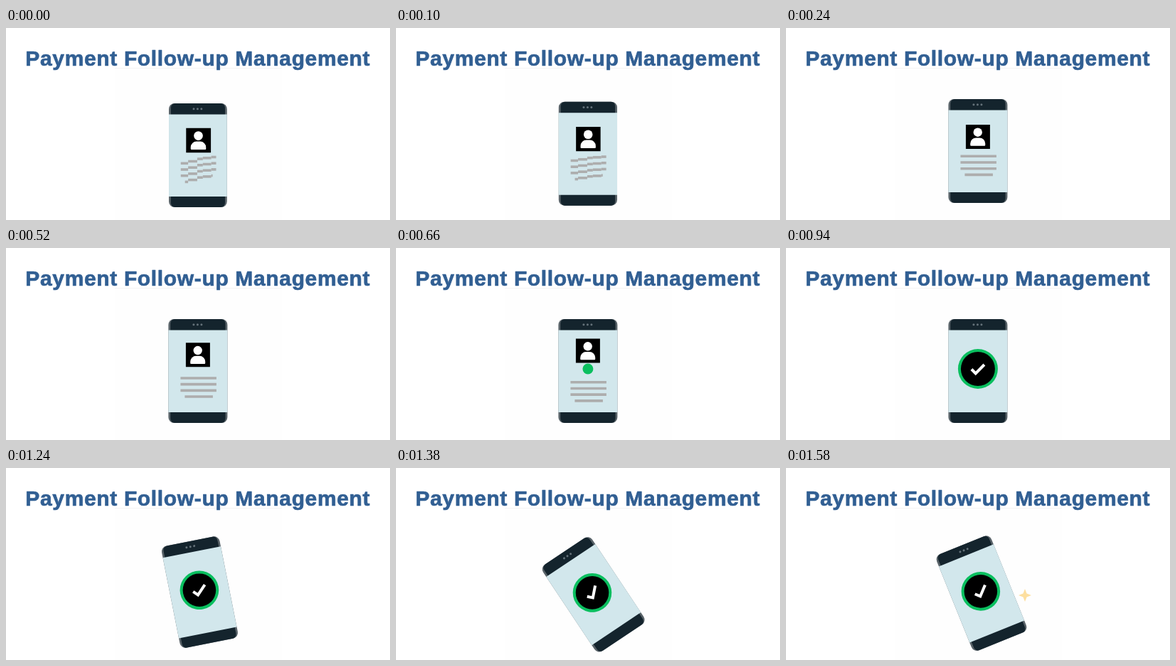
An HTML page with a canvas for the animation above (1.6 s loop, 540 by 270 pixels).

```html
<!DOCTYPE html>
<html lang="en">
<head>
<meta charset="utf-8">
<title>Payment Follow-up Management</title>
<style>
  html, body { margin: 0; width: 100%; height: 100%; overflow: hidden; background: #fff; }
  canvas { display: block; }
</style>
</head>
<body>
<canvas id="stage" width="540" height="270"></canvas>
<script>
const ctx = document.getElementById('stage').getContext('2d');
const LOOP = 1600;
const INK = '#14242d', EDGE = '#586268', SCREEN = '#d2e7ec', GREEN = '#0abf5f', TITLE = '#315f93';

const mix = (a, b, u) => a + (b - a) * u;
const span = (t, from, to) => Math.min(1, Math.max(0, (t - from) / (to - from)));
const smooth = u => u * u * (3 - 2 * u);

function box(x, y, w, h, color, radius = 0) {
  ctx.fillStyle = color;
  ctx.beginPath();
  ctx.roundRect(x, y, w, h, radius);
  ctx.fill();
}

function disc(x, y, r, color) {
  ctx.fillStyle = color;
  ctx.beginPath();
  ctx.arc(x, y, r, 0, Math.PI * 2);
  ctx.fill();
}

function drawBackdrop() {
  box(0, 0, 540, 270, '#fff');
  box(153, 56, 235, 214, '#fefefe');
  box(153, 56, 235, 1, '#f4f4f4');
  ctx.fillStyle = ctx.strokeStyle = TITLE;
  ctx.lineWidth = 0.7;
  ctx.lineJoin = 'round';
  ctx.font = 'bold 30px "Liberation Sans", Arial, sans-serif';
  ctx.letterSpacing = '0.65px';
  ctx.fillText('Payment Follow-up Management', 27.3, 53.3);
  ctx.strokeText('Payment Follow-up Management', 27.3, 53.3);
}

function drawBody() {
  box(-41.5, -73, 83, 146, EDGE, 8);
  box(-38.7, -73, 77.4, 146, INK, 6);
  box(-41.5, -57.5, 83, 115.5, SCREEN);
  for (const x of [-6, -0.5, 5]) disc(x, -65.3, 1.5, '#65727a');
}

function drawAvatar(y, drop) {
  ctx.save();
  ctx.translate(0.8 * drop, y - 20);
  ctx.scale(1 + 0.04 * drop, 1 + 0.02 * drop);
  box(-17, -17, 34, 34, '#000');
  disc(-0.2, -6.3, 6.2, '#fff');
  box(-10.7, 1.5, 21, 11.2, '#fff', [8, 8, 1, 1]);
  ctx.restore();
}

// The text lines start as skewed steps and settle into straight bars.
function drawLines(y, skew) {
  const edges = [-24.5, -14, -1, 7, 19, 26];
  const offsets = [4, 1.2, -2.2, -3.5, -4.8];
  for (let row = 0; row < 4; row++) {
    const top = y + 5.5 + row * 8.7;
    const left = row < 3 ? -24.5 : -18.5, right = row < 3 ? 26 : 21;
    if (!skew) {
      box(left, top, right - left, 3.6, '#adadad');
      continue;
    }
    offsets.forEach((dy, i) => {
      const a = Math.max(left, edges[i]), b = Math.min(right, edges[i + 1]);
      box(a, top + dy * skew, b - a, 3.6, '#adadad');
    });
  }
}

function drawBadge(t) {
  const grow = Math.sin(span(t, 631, 820) * Math.PI / 2);
  const r = 30.3 * grow - 2.3 * smooth(span(t, 820, 920)) - 0.7 * smooth(span(t, 940, 1240));
  if (r <= 0) return;
  disc(0, -3, r, GREEN);
  disc(0, -3, (r - 4) * smooth(span(t, 670, 800)), '#000');
  const scale = smooth(span(t, 740, 860));
  if (!scale) return;
  ctx.save();
  ctx.translate(0, -3);
  ctx.scale(scale, scale);
  ctx.strokeStyle = '#fff';
  ctx.lineWidth = 4;
  ctx.lineJoin = 'miter';
  ctx.beginPath();
  ctx.moveTo(-9, 0.5);
  ctx.lineTo(-3.2, 6.3);
  ctx.lineTo(9, -6);
  ctx.stroke();
  ctx.restore();
}

function drawSparkle(t) {
  const r = 9 * smooth(span(t, 1490, 1580));
  ctx.fillStyle = '#fddf9f';
  ctx.beginPath();
  for (let i = 0; i < 8; i++) {
    const a = i * Math.PI / 4, d = i % 2 ? r * 0.4 : r;
    ctx.lineTo(336 + d * Math.cos(a), 179 + d * Math.sin(a));
  }
  ctx.fill();
}

function draw(t) {
  drawBackdrop();
  const drop = 1 - smooth(span(t, 0, 240));
  const tilt = 34.5 * smooth(span(t, 940, 1400) ** 2.27) - 12.5 * span(t, 1460, 1580) ** 1.6;

  ctx.save();
  ctx.translate(269.9 + 0.23 * tilt, 173 + 6 * drop + 0.145 * tilt);
  ctx.rotate(-tilt * Math.PI / 180);
  ctx.scale(mix(1, 0.985, drop), 1);
  drawBody();

  const part = 11 * smooth(span(t, 400, 780));
  ctx.globalAlpha = 1 - span(t, 680, 800);
  if (ctx.globalAlpha > 0) {
    drawAvatar(-part - drop, drop);
    drawLines(part, drop);
  }
  ctx.globalAlpha = 1;
  drawBadge(t);
  ctx.restore();
  drawSparkle(t);
}

function tick() {
  draw(performance.now() % LOOP);
  requestAnimationFrame(tick);
}
tick();
</script>
</body>
</html>
```
